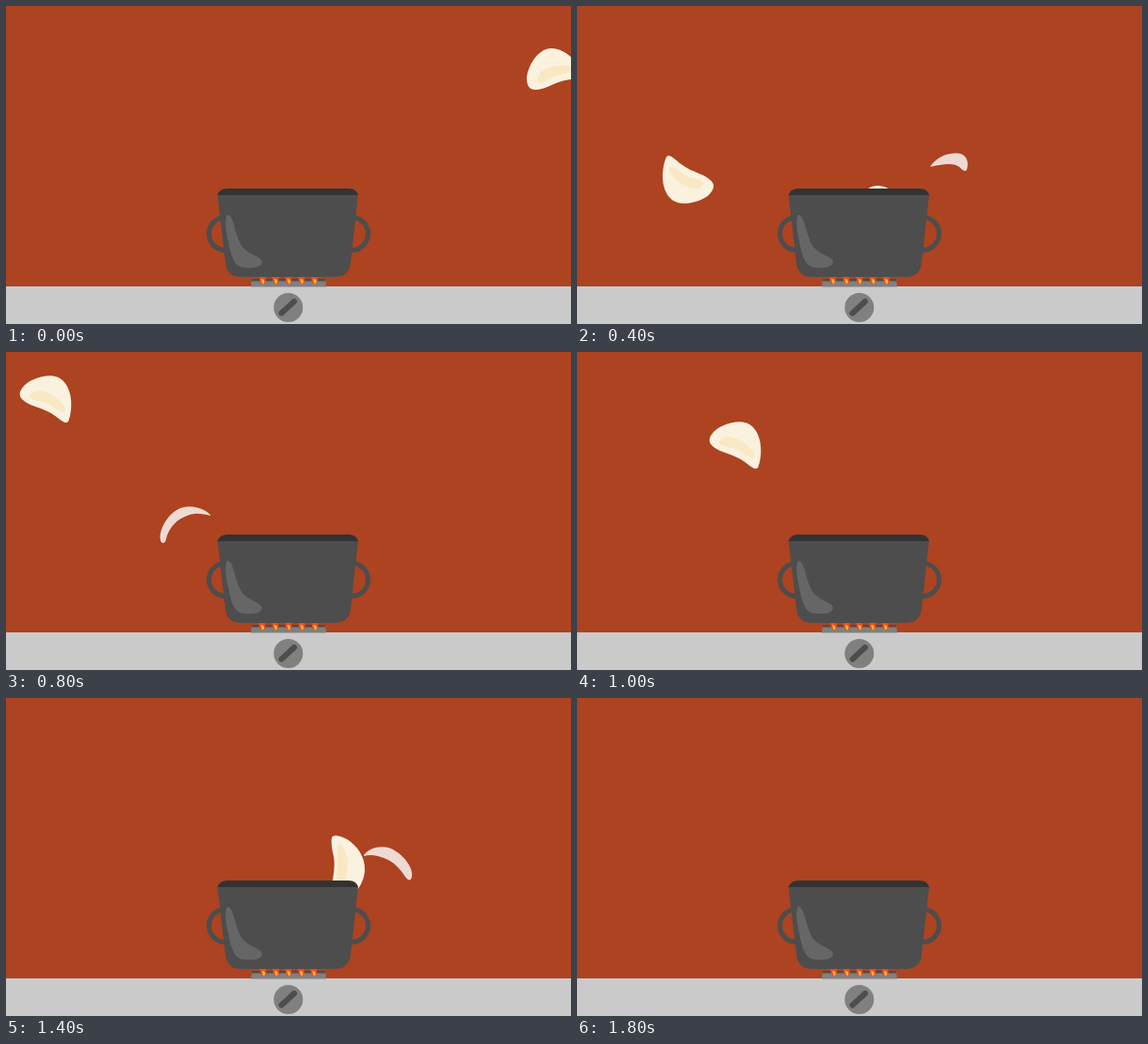
These frames come from a looping animation (600 by 338 pixels, 1900 ms). An HTML page:

```html
<!DOCTYPE html>
<html>
<head>
<meta charset="utf-8">
<style>
  html, body { margin: 0; overflow: hidden; background: #ad4320; }
  svg { display: block; width: 600px; height: 338px; }
</style>
</head>
<body>
<svg viewBox="0 0 600 338">
  <defs>
    <g id="wide">
      <path fill="#faf2df" d="M30 5C27-3 14-21-3-22C-19-23-30 0-30 10C-30 18-27 22-21 22C-11 22-4 16 7 13C16 10 24 11 28 9Q31 8 30 5Z"/>
      <path fill="#f9e8c4" d="M-18 14C-21 2-5-4 8-4C16-4 21-2 20 1C18 6 6 4-4 9C-10 13-17 17-18 14Z"/>
    </g>
    <g id="slim">
      <path fill="#faf2df" d="M-17-30C-16-34-8-32-2-29C10-22 18-10 18 3C18 18 8 33-6 33C-13 33-17 28-17 22C-16 12-13 2-15-10C-17-18-18-25-17-30Z"/>
      <path fill="#f9e8c4" d="M-9-23C-4-22 0-10 0 0C0 10-4 21-10 21C-16 20-10 4-11-5C-12-15-11-23-9-23Z"/>
    </g>
    <g id="peelLeft" fill="#eedad3">
      <path d="M217 173C210 166 195 161 183 167C171 173 162 190 164 200C165 204 169 204 170 199C172 190 178 180 190 175C200 170 208 172 217 174Z"/>
    </g>
    <g id="peelShort" fill="#eedad3">
      <path d="M375 171C382 160 395 155 407 157C415 159 416 168 414 174C412 177 409 174 406 171C400 166 388 168 375 171Z"/>
    </g>
    <g id="peelLong" fill="#eedad3">
      <path d="M380 167C387 158 403 155 414 163C424 169 433 182 431 190C430 195 427 194 424 190C419 182 411 173 401 170C393 167 387 166 380 168Z"/>
    </g>
    <g id="flame">
      <path fill="#e8501e" d="M-3.5 288H3L3.5 292Q3 296 0 296Q-3 295-3.5 288Z"/>
      <path fill="#fbb03b" d="M-1.5 290Q2 290 2 293Q2 295.500 0 295.500Q-1 293-1.500 290Z"/>
    </g>
  </defs>

  <g id="flying"></g>

  <path fill="#cbcacb" d="M0 298H600V338H0Z"/>
  <path fill="#808080" d="M261 290H339L340 298.500H260Z"/>
  <path fill="#4d4d4d" d="M261 290H339V292.500H261Z"/>
  <g id="flames"></g>

  <g fill="none" stroke="#4d4d4d" stroke-width="5">
    <circle cx="233" cy="242" r="17.500"/>
    <circle cx="367" cy="242" r="17.500"/>
  </g>
  <path fill="#4d4d4d" d="M224.500 200H374L366 273Q364 288 349 288H249Q235 288 233 273Z"/>
  <path fill="#333" d="M224.500 201Q227 194 235 194H364Q372 194 374 201Z"/>
  <path fill="#666" d="M235 222C232 226 233 237 236 250C239 267 243 278 253 278C263 279 271 278 272 272C271 266 259 265 251 256C243 245 242 221 235 222Z"/>

  <circle cx="299.800" cy="320.500" r="15.500" fill="#808080"/>
  <path d="M292.500 326.500L306 314" stroke="#4d4d4d" stroke-width="6" stroke-linecap="round"/>
</svg>
<script>
const LOOP = 1900, STEP = 100;

// Each item appears at its start step and visits one point per step.
const items = [
  { shape: "wide", turn: 0, start: 0, path: [[583, 67], [501, 64], [419, 83], [365, 138], [323, 213]] },
  { shape: "wide", turn: 226, start: 3, path: [[79, 232], [112, 186], [164, 160], [220, 168], [270, 225]] },
  { shape: "wide", turn: 43, start: 8, path: [[48, 49], [110, 58], [174, 98], [235, 165], [275, 240]] },
  { shape: "slim", turn: 0, start: 12, path: [[571, 175], [467, 135], [363, 178.5], [300, 250]] },
  { shape: "peelShort", turn: 0, start: 4, path: [[0, 0], [18, 12]] },
  { shape: "peelLeft", turn: 0, start: 8, path: [[0, 0], [-18, 12]] },
  { shape: "peelLeft", turn: 0, start: 12, path: [[0, 0], [-18, 12]] },
  { shape: "peelLong", turn: 0, start: 14, path: [[0, 0], [18, 12]] }
];

function addUse(parentId, shape) {
  const node = document.createElementNS("http://www.w3.org/2000/svg", "use");
  node.setAttribute("href", "#" + shape);
  return document.getElementById(parentId).appendChild(node);
}

for (const item of items) item.node = addUse("flying", item.shape);
const flames = [-2, -1, 0, 1, 2].map(slot => ({ slot, node: addUse("flames", "flame") }));

function draw(now) {
  const step = Math.floor((now % LOOP) / STEP);
  for (const { node, turn, start, path } of items) {
    const point = path[step - start];
    node.style.display = point ? "" : "none";
    if (point) node.setAttribute("transform", `translate(${point}) rotate(${turn})`);
  }
  const sway = Math.sin(2 * Math.PI * step * STEP / LOOP);
  for (const { slot, node } of flames) {
    node.setAttribute("transform", `translate(${300 + slot * (13.8 + 0.4 * sway)})`);
  }
}

function tick() {
  draw(performance.now());
  requestAnimationFrame(tick);
}
tick();
</script>
</body>
</html>
```
